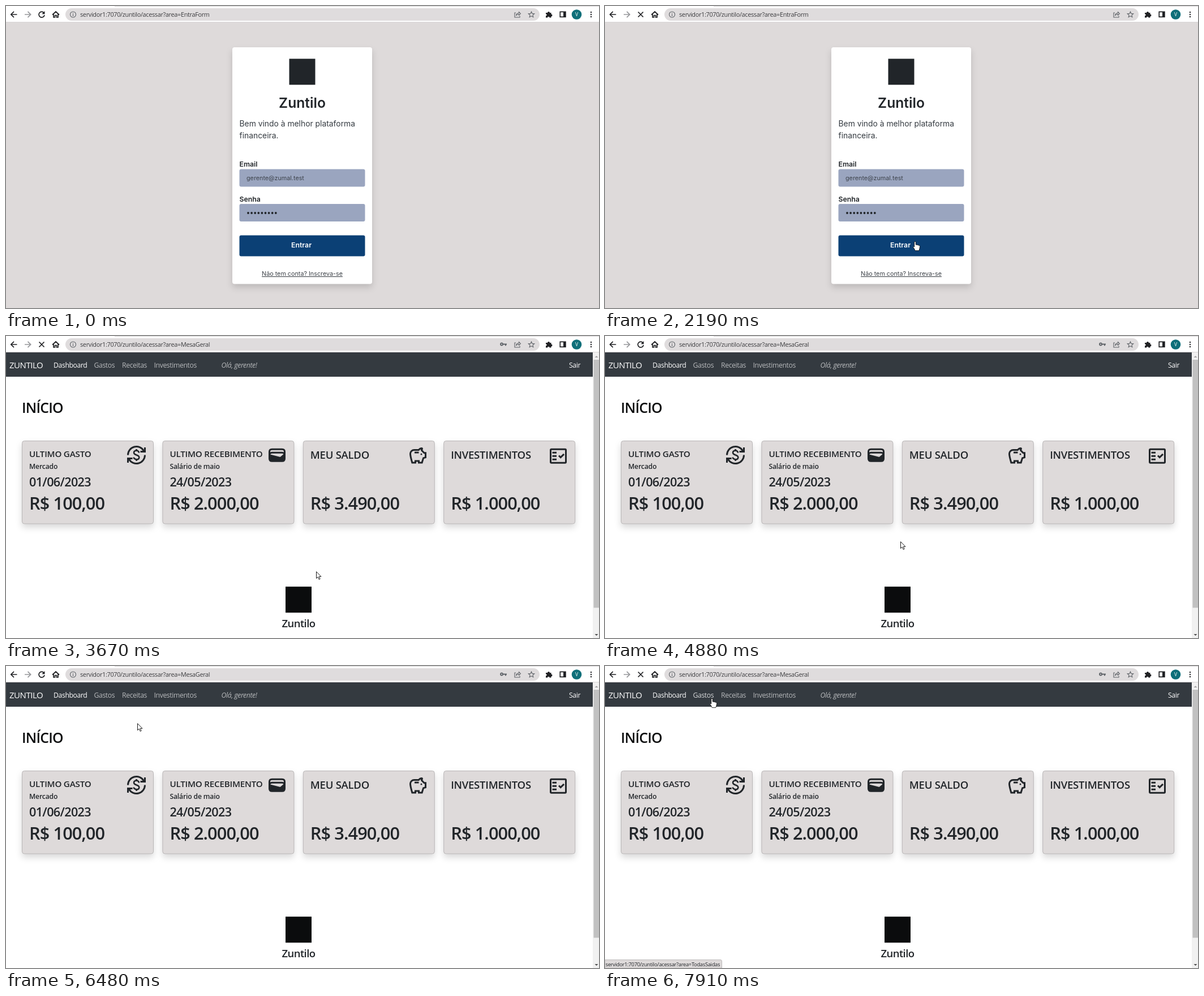
An HTML page for the animation above (8 s loop, 1048x534 px).

```html
<!DOCTYPE html>
<html lang="pt-BR">
<head>
<meta charset="utf-8">
<title>Painel financeiro</title>
<style>
  html, body { margin: 0; width: 100%; height: 100%; overflow: hidden; background: #fff; }
  svg { display: block; width: 100vw; height: 100vh; }
  text { font-family: "Open Sans", "Noto Sans", sans-serif; letter-spacing: -.03em; fill: #212529; white-space: pre; }
  #login text { font-family: Inter, sans-serif; letter-spacing: 0; }
  #login .label { font-size: 12.32px; font-weight: 600; }
  #login .lead { font-size: 13.86px; fill: #343a40; }
  .small { font-size: 10.78px; }
  .url { font-size: 10.9px; fill: #3c3c3f; }
  .nav text { font-size: 12.2px; fill: #fff; }
  .nav .link { fill: #b8babc; }
  .strong { font-weight: 600; }
  .words { letter-spacing: -.014em; }
  .mid { text-anchor: middle; }
  .panel { filter: drop-shadow(0 6px 6px rgba(0, 0, 0, .15)); }
  .icon { fill: #212529; fill-rule: evenodd; }
  .line { fill: none; stroke: #212529; stroke-width: 3; }
  .bar { fill: none; stroke: #202124; stroke-width: 1.7; }
  .soft { fill: none; stroke: #5f6368; stroke-width: 1.1; }
</style>
</head>
<body>
<svg viewBox="0 0 1048 534" xmlns="http://www.w3.org/2000/svg">
  <g id="toolbar">
    <rect width="1048" height="29" fill="#fff"/>
    <path d="M192 .5H1048M0 28.5H1048" stroke="#d8d5d6"/>
    <rect x="105" y="4" width="838" height="22" rx="11" fill="#dfdcdd"/>
    <path class="bar" d="M19.5 15H9M14 9.8L8.8 15L14 20.2"/>
    <path class="bar" style="stroke:#96989b" d="M33 15H43.5M38.5 9.8L43.7 15L38.5 20.2"/>
    <g id="reload">
      <path class="bar" d="M67 12A5 5 0 1 0 68 16"/>
      <path d="M68.5 9V14.2H63.3Z" fill="#202124"/>
    </g>
    <path id="stop" class="bar" d="M58.5 10.5L67.5 19.5M67.5 10.5L58.5 19.5"/>
    <path class="bar" d="M82 15.5L88 10L94 15.5M84 14.5V20H86.5V16.5H89.5V20H92V14.5"/>
    <circle class="soft" cx="118.5" cy="15" r="5"/>
    <path class="soft" d="M118.5 14.3V18M118.5 12V13.2"/>
    <text id="address" class="url" x="131" y="18.6"></text>
    <g id="key">
      <circle cx="876" cy="14.5" r="2" fill="none" stroke="#5f6368" stroke-width="1.8"/>
      <path d="M878 14.5H885M883 14.5V17.3" fill="none" stroke="#5f6368" stroke-width="2"/>
    </g>
    <path class="soft" d="M901 12H899V20H908V17.5M901.5 17Q902 12.5 906.5 12.5V10.5L909.5 13.5L906.5 16.3V14.5Q903 14.5 901.5 17Z"/>
    <path class="soft" d="M928.5 10L930 13.4L933.7 13.7L930.9 16.1L931.8 19.7L928.5 17.8L925.2 19.7L926.1 16.1L923.3 13.7L927 13.4Z"/>
    <path fill="#202124" d="M954 12H957A2 2 0 0 1 961 12H963.5V14.5A2 2 0 0 1 963.5 18.5V20.5H960.5A1.7 1.7 0 0 0 957.1 20.5H954V17.5A1.7 1.7 0 0 0 954 14.1Z"/>
    <rect class="bar" x="979.3" y="10.3" width="9.6" height="9"/>
    <rect x="985" y="10" width="4" height="9.5" fill="#202124"/>
    <circle cx="1008.5" cy="15" r="8.8" fill="#0e6f79"/>
    <text class="mid" x="1008.5" y="18" style="font-size:8.5px;fill:#fff">V</text>
    <path d="M1034 11V19.5" stroke="#202124" stroke-width="2.4" stroke-linecap="round" stroke-dasharray="0 4"/>
  </g>

  <g id="login">
    <rect y="29" width="1048" height="505" fill="#dedada"/>
    <rect class="panel" x="400" y="73" width="247" height="418.5" rx="4" fill="#fff"/>
    <rect x="500.5" y="93.3" width="46" height="46" fill="#212529"/>
    <text class="mid strong" x="523.5" y="180" style="font-size:24.64px">Zuntilo</text>
    <text class="lead" x="412.5" y="213">Bem vindo à melhor plataforma</text>
    <text class="lead" x="412.5" y="233.5">financeira.</text>
    <text class="label" x="412.5" y="283.7">Email</text>
    <rect x="412.5" y="288.5" width="222" height="31" rx="3" fill="#9aa5bf"/>
    <text class="small" x="425" y="307.5" style="fill:#3d434c">gerente@zumal.test</text>
    <text class="label" x="412.5" y="345.5">Senha</text>
    <rect x="412.5" y="350" width="222" height="31" rx="3" fill="#9aa5bf"/>
    <path d="M428 366H478" stroke="#212529" stroke-width="3.8" stroke-linecap="round" stroke-dasharray="0 6.1"/>
    <rect x="412.5" y="405.5" width="222" height="37" rx="3" fill="#0b4075"/>
    <text class="label mid" x="522" y="427" style="fill:#fff">Entrar</text>
    <text class="small mid" x="523.5" y="477" style="fill:#3d4248;text-decoration:underline">Não tem conta? Inscreva-se</text>
  </g>

  <g id="home">
    <rect y="29" width="1048" height="505" fill="#fff"/>
    <g class="nav">
      <rect y="29" width="1037" height="43" fill="#343a40"/>
      <text x="6" y="56.5" style="font-size:15px">ZUNTILO</text>
      <text x="84" y="55.5">Dashboard</text>
      <text id="expenses" class="link" x="155.5" y="55.5">Gastos</text>
      <text class="link" x="205" y="55.5">Receitas</text>
      <text class="link" x="261.5" y="55.5">Investimentos</text>
      <text class="link" x="380.5" y="55.5" font-style="italic">Olá, gerente!</text>
      <text x="995" y="55.5">Sair</text>
    </g>
    <text class="strong" x="28" y="135.5" style="font-size:24.8px;fill:#0b0c0d">INÍCIO</text>
    <g id="cards"></g>
    <g class="line">
      <path d="M215.5 210.5A15 15 0 0 1 243.5 203M245.5 210.5A15 15 0 0 1 217.5 218"/>
      <path d="M245.5 197V204.5H237.5M215.5 224V216.5H223.5"/>
      <path style="stroke-width:2.6" d="M235.2 206.5Q234 202.5 230.5 202.5Q226 203 226 206.3Q226 209 230.8 210.5Q235.3 212 235.3 214.8Q235 218.3 230.5 218.3Q226.5 218 225.5 214.5M230.5 200V203M230.5 218V221"/>
    </g>
    <path class="icon" transform="translate(461 192.7) scale(1.5)" d="M18 4H6Q2 4 2 8V16Q2 20 6 20H18Q22 20 22 16V8Q22 4 18 4ZM16.1 13.8Q15.800 14.100 15.300 14L4.150 11.250Q4.600 10 6 10H18Q19 10 19.600 10.800ZM6 6H18Q20 6 20 8V8.550Q19 8 18 8H6Q5 8 4 8.550V8Q4 6 6 6Z"/>
    <path class="icon" transform="translate(710 194) scale(1.5)" d="M15 10a1 1 0 0 1 2 0a1 1 0 0 1 -2 0ZM8 9H13V7H8ZM22 7.5V14.5L19.2 15.4L17.5 21H12V19H10V21H4.5Q2 12.5 2 9.5A5.5 5.5 0 0 1 7.500 4H12.500Q14 2 16.500 2A1.500 1.500 0 0 1 17.900 4L17.500 5.200L19.800 7.500ZM20 9.500H19L15.500 6L15.300 4.300Q13.800 4.800 13.500 6H7.500A3.500 3.500 0 0 0 4 9.500Q4 11.800 6 19H8V17H14V19H16L17.600 13.800L20 13Z"/>
    <path class="icon" transform="translate(958 194.3) scale(1.5)" d="M20 3H4Q2 3 2 5V19Q2 21 4 21H20Q22 21 22 19V5Q22 3 20 3ZM20 19H4V5H20ZM19.4 10.4L18 9L14.800 12.200L13.400 10.800L12 12.200L14.800 15ZM5 7H10V9H5ZM5 11H10V13H5ZM5 15H10V17H5Z"/>
    <rect x="494" y="443.2" width="46" height="46" fill="#0b0c0d"/>
    <text class="mid strong" x="517" y="515" style="font-size:18.5px">Zuntilo</text>
    <rect x="1037" y="29" width="11" height="505" fill="#f1f1f1"/>
    <rect x="1038.5" y="42" width="9.5" height="438.5" fill="#c1c1c1"/>
    <path d="M1040.5 38L1043.5 35L1046.5 38Z" fill="#a3a3a3"/>
    <path d="M1040.5 527L1043.5 530L1046.5 527Z" fill="#505050"/>
    <g id="status">
      <path d="M0 519.5H204Q206.5 519.5 206.5 522V534H0Z" fill="#dedada" stroke="#bdbabb"/>
      <text x="1" y="530.6" style="font-size:9.3px">servidor1:7070/zuntilo/acessar?area=TodasSaidas</text>
    </g>
  </g>

  <circle id="ring" r="9.5" fill="#ff0" fill-opacity=".47"/>
  <g id="pointer" stroke-linejoin="round" fill="#fff" stroke="#000">
    <path id="arrow" stroke-width=".9" d="M.5 .7V12.6L3.2 10.1L5.2 14.5L7.1 13.6L5.2 9.4H8.9Z"/>
    <path id="hand" stroke-width=".8" d="M-1.3 1.2Q0 -.4 1.3 1.2V6L3.4 6.3L5.5 6.8L7.6 7.5Q8.7 8 8.6 9.5L8 13L6.8 16.6H.2L-1.6 13L-3.6 10.2Q-3.4 8.5 -1.3 10Z"/>
  </g>
</svg>
<script>
const LOOP = 8000;
const el = id => document.getElementById(id);
const show = (id, on) => { el(id).style.display = on ? "" : "none"; };

const cards = [
  { title: "ULTIMO GASTO", note: "Mercado", date: "01/06/2023", value: "R$ 100,00" },
  { title: "ULTIMO RECEBIMENTO", note: "Salário de maio", date: "24/05/2023", value: "R$ 2.000,00" },
  { title: "MEU SALDO", value: "R$ 3.490,00" },
  { title: "INVESTIMENTOS", value: "R$ 1.000,00" }
];

function cardMarkup({ title, note, date, value }, i) {
  const x = 28 + i * 248.4;
  const line = (str, y, size, kind = "") =>
    str ? `<text class="strong ${kind}" x="${x + 13}" y="${y}" style="font-size:${size}px">${str}</text>` : "";
  return `<rect class="panel" x="${x + .5}" y="185.5" width="232" height="146.5" rx="4" fill="#dedada" stroke="#b9b6b7"/>`
    + (note ? line(title, 213.5, 15.2, "words") : line(title, 216.5, 18.5, "words"))
    + line(note, 235, 12.2, "words") + line(date, 265.5, 21.6) + line(value, 306.5, 30.8);
}
el("cards").innerHTML = cards.map(cardMarkup).join("");

// start, end, steps, from, to, easing power per axis
const moves = [
  [220, 990, 12, [968, 497], [640, 418], [1.2, 1.2]],
  [1060, 1590, 9, [640, 418], [547.5, 415.5], [2, 1]],
  [4740, 5500, 12, [547.5, 415.5], [425, 162], [.8, .8]],
  [5570, 6340, 12, [425, 162], [251, 112], [1.5, 2.28]],
  [6410, 7170, 12, [251, 112], [197, 60], [2.36, 1.3]],
  [7230, 7450, 4, [197, 60], [188.5, 57], [1, 1]]
];

function pointerAt(t) {
  const move = moves.filter(m => t >= m[0]).pop();
  if (!move) return null;
  const [start, end, steps, from, to, power] = move;
  const step = Math.min(steps - 1, Math.floor((t - start) / (end - start) * (steps - 1) + .15));
  const p = (step + 1) / steps;
  return from.map((a, i) => Math.round(a + (to[i] - a) * (1 - (1 - p) ** power[i])));
}

function draw(t) {
  const home = t >= 3670;
  const posted = t >= 2320;
  const loading = (t >= 2190 && t < 3740) || t >= 7910;
  const pos = pointerAt(t);
  show("login", !home);
  show("home", home);
  show("key", posted);
  show("stop", loading);
  show("reload", !loading);
  el("address").textContent = "servidor1:7070/zuntilo/acessar?area=" + (posted ? "MesaGeral" : "EntraForm");

  show("pointer", pos);
  const [x, y] = pos || [0, 0];
  const overLink = home && x > 150 && x < 199 && y < 66;
  const overButton = t >= 1060 && t < 3480 && x < 634.5;
  const hand = overLink || overButton;
  show("hand", hand);
  show("arrow", !hand);
  el("pointer").setAttribute("transform", `translate(${x} ${y})`);
  el("expenses").style.fill = overLink ? "#d6d8d9" : "";

  show("ring", (t >= 2050 && t < 2190) || (t >= 7780 && t < 7910));
  el("ring").setAttribute("transform", `translate(${x} ${y})`);
  el("status").style.opacity = Math.max(0, Math.min(1, (t - 7200) / 250));
}

const began = performance.now();
function tick() {
  draw((performance.now() - began) % LOOP);
  requestAnimationFrame(tick);
}
tick();
</script>
</body>
</html>
```
